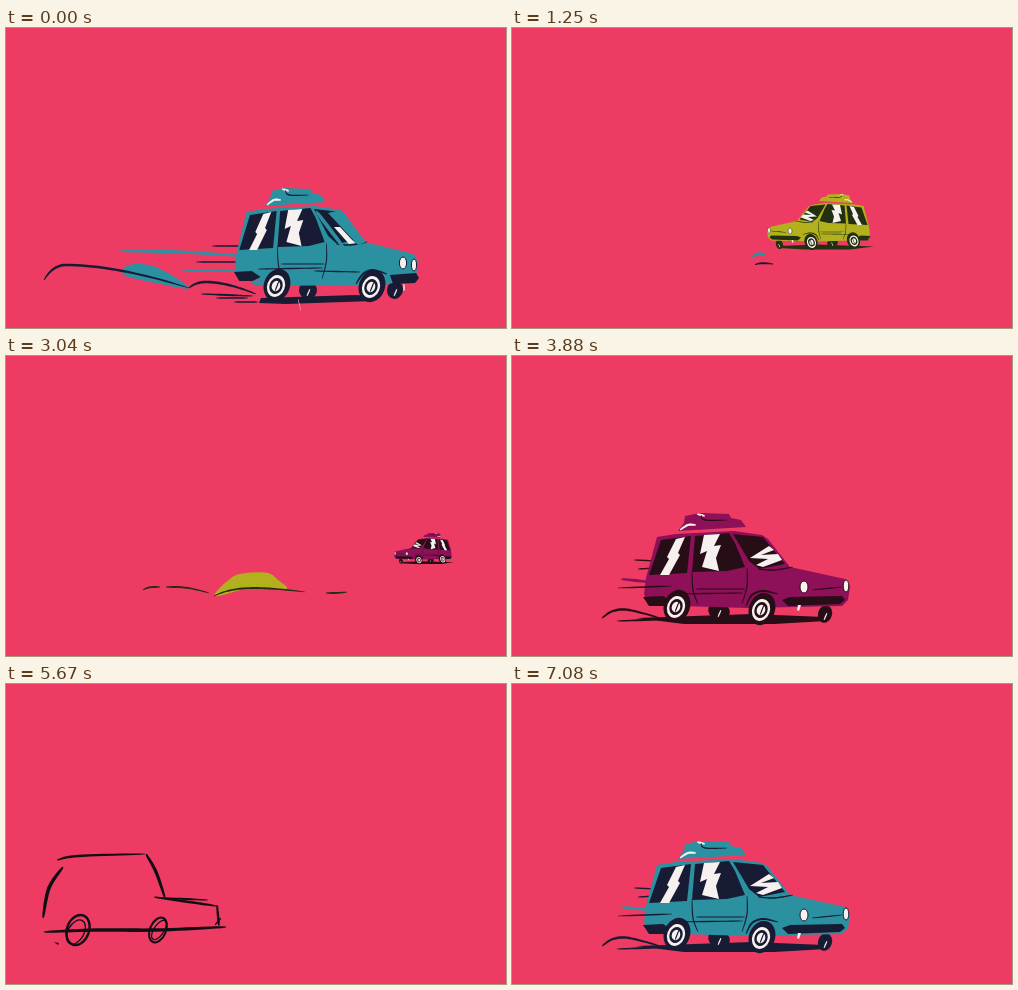
Recreate the animation shown at these times as an HTML page with a canvas. Size 500 by 300 pixels, loop 7120 ms.

```html
<!DOCTYPE html>
<html lang="en">
<head>
<meta charset="utf-8">
<title>Road trip</title>
<style>
html, body { margin: 0; width: 100%; height: 100%; overflow: hidden; background: #ed3b63; }
canvas { display: block; width: 100vw; height: 100vh; }
</style>
</head>
<body>
<canvas id="stage" width="500" height="300"></canvas>
<script>
const g = document.getElementById('stage').getContext('2d');
const LOOP = 7120, FRAMES = 171;
const BG = '#ed3b63', WHITE = '#f6f1ef';

// `at` is the frame (24 per second) in which the car is in full swing to the right
const CARS = [
  { at: 0, body: '#2b90a0', dark: '#171b33' },
  { at: 47, body: '#b2b01d', dark: '#22300f' },
  { at: 94, body: '#8e1058', dark: '#260d16' },
  { at: 138, dark: '#120f14', rough: true }
];

// Drawings are held on twos, on ones at full speed, on threes for the rough car
function held(n) {
  if (n >= 130 && n < 145) return n < 141 ? n - (n - 130) % 3 : 141;
  if (n >= 145 && n < 148) return 145;
  const odd = n > 48 && n < 94;
  const fast = CARS.some(c => !c.rough && Math.abs(n - c.at) < 2);
  return fast || n % 2 === (odd ? 1 : 0) ? n : n - 1;
}

const mix = (a, b, k) => a + (b - a) * k;

// keys: [time, ...numbers]; null outside the covered span
function tween(keys, t) {
  if (t < keys[0][0] || t > keys[keys.length - 1][0]) return null;
  let i = 0;
  while (i < keys.length - 2 && t > keys[i + 1][0]) i++;
  const a = keys[i], b = keys[i + 1] || a, k = (t - a[0]) / (b[0] - a[0] || 1);
  return a.slice(1).map((v, j) => mix(v, b[j + 1], k));
}

const pairs = p => p.filter((_, i) => i % 2 === 0).map((x, i) => [x, p[2 * i + 1]]);

// Catmull-Rom samples through points
function curve(pts, closed) {
  const n = pts.length, out = [];
  const at = i => pts[closed ? (i + n) % n : Math.max(0, Math.min(n - 1, i))];
  for (let i = 0; i < (closed ? n : n - 1); i++) {
    const [a, b, c, d] = [at(i - 1), at(i), at(i + 1), at(i + 2)];
    for (let u = 0; u < 0.99; u += 0.1) {
      out.push([0, 1].map(j => b[j] + u / 2 * (c[j] - a[j] + u * (2 * a[j] - 5 * b[j] + 4 * c[j] - d[j]
        + u * (3 * (b[j] - c[j]) + d[j] - a[j])))));
    }
  }
  if (!closed) out.push(at(n - 1));
  return out;
}

// Rises steeply to the peak, then falls away gently
function hill([ax, ay, px, py, bx, by]) {
  const out = [];
  const arc = (x0, y0, cx, x1, y1) => {
    for (let u = 0; u < 1; u += 0.05) {
      const v = 1 - u;
      out.push([v * v * x0 + 2 * u * v * cx + u * u * x1, v * v * y0 + 2 * u * v * py + u * u * y1]);
    }
  };
  arc(ax, ay, mix(ax, px, 0.4), px, py);
  arc(px, py, mix(px, bx, 0.4), bx, by);
  out.push([bx, by]);
  return out;
}

function fill(color, pts) {
  g.fillStyle = color;
  g.beginPath();
  pts.forEach(([x, y]) => g.lineTo(x, y));
  g.closePath();
  g.fill();
}

const poly = (color, ...p) => fill(color, pairs(p));

// Brush line, thin at both ends
function ink(color, w, c) {
  const up = [], down = [], last = c.length - 1;
  c.forEach(([x, y], i) => {
    const a = c[Math.max(0, i - 1)], b = c[Math.min(last, i + 1)];
    const dx = b[0] - a[0], dy = b[1] - a[1], len = Math.hypot(dx, dy) || 1;
    const h = w / 2 * (0.25 + 0.75 * Math.pow(Math.max(0, Math.sin(Math.PI * i / last)), 0.45));
    up.push([x - dy / len * h, y + dx / len * h]);
    down.unshift([x + dy / len * h, y - dx / len * h]);
  });
  fill(color, up.concat(down));
}

const brush = (color, w, ...p) => ink(color, w, curve(pairs(p)));

function oval(color, x, y, rx, ry, rot = 0, line = 0) {
  g.beginPath();
  g.ellipse(x, y, rx, ry, rot, 0, 7);
  g.fillStyle = g.strokeStyle = color;
  g.lineWidth = line;
  line ? g.stroke() : g.fill();
}

function wheel(d, x, y) {
  [d, WHITE, d, WHITE].forEach((color, i) => {
    const k = [1, 0.68, 0.5, 0.32][i];
    oval(color, x - (i && 1), y + (i && 1), 13 * k, 16.5 * k, 0.35);
  });
  brush(d, 1.2, x + 2, y - 4, x - 2, y + 6);
}

function farWheel(d, x, y, rx) {
  oval(d, x, y, rx, 9, 0.3);
  brush(WHITE, 1.3, x - 1, y + 6, x + 2, y - 1);
}

function lamp(d, x, y, rx) {
  oval(WHITE, x, y, rx, 6);
  oval(d, x, y, rx, 6, 0, 1);
}

function shell(c, d) {
  poly(c, 173, 160, 188, 157, 217, 158, 219, 162, 229, 164, 234, 171, 166, 175, 172, 167);
  brush(WHITE, 2.2, 168, 174, 176, 169, 184, 169);
  brush(WHITE, 2, 185, 158, 193, 160);
  brush(d, 1.3, 189, 159, 193, 164, 215, 164);
  poly(c, 145, 181, 164, 178, 222, 175, 250, 179, 256, 183, 278, 211, 333, 223, 338, 230,
    336, 244, 330, 250, 235, 252, 136, 249, 132, 238, 134, 222);
  poly(d, 149, 184, 179, 180, 175, 217, 137, 219);
  poly(WHITE, 164, 183, 173, 181, 166, 197, 168, 199, 157, 219, 148, 219, 157, 203, 155, 201);
  poly(d, 183, 180, 217, 177, 223, 187, 233, 211, 215, 215, 180, 216);
  poly(WHITE, 192, 179, 208, 178, 202, 190, 209, 189, 204, 202, 207, 215, 190, 211, 195, 195, 188, 198);
  poly(d, 221, 178, 251, 181, 273, 208, 247, 213, 237, 205);
  brush(d, 1.5, 246, 213, 262, 214, 281, 211);
  brush(d, 1.2, 180, 215, 181, 234, 186, 248);
  brush(d, 1.2, 235, 212, 235, 230, 230, 248);
  brush(d, 1.1, 184, 233, 233, 233);
  brush(d, 1.3, 158, 238, 231, 237);
  poly(d, 131, 241, 151, 240, 161, 246, 152, 250, 137, 250);
}

// Three-quarter view: nose at x 338, ground at y 268
function carFront({ body: c, dark: d }, fast) {
  if (fast) {
    brush(d, 2.4, 90, 262, 101, 255, 117, 254, 148, 262);
    brush(d, 1.8, 105, 265, 160, 263);
    brush(d, 1.4, 122, 204, 146, 205);
    brush(d, 1.4, 126, 213, 144, 212);
    brush(c, 2.8, 109, 223, 138, 226);
  }
  poly(d, 124, 262, 240, 258, 312, 261, 314, 265, 262, 268, 172, 268);
  farWheel(d, 207, 255, 11);
  farWheel(d, 313, 258, 7);
  shell(c, d);
  poly(WHITE, 238, 202, 257, 190, 262, 194, 249, 199, 266, 198, 270, 204, 251, 211, 244, 209, 256, 203);
  if (fast) brush(d, 1.4, 106, 232, 160, 230);
  brush(d, 1.2, 300, 234, 330, 231);
  poly(d, 270, 244, 278, 241, 330, 240, 333, 244, 328, 248, 276, 250);
  poly(WHITE, 286, 249, 289, 249, 287, 255, 285, 254);
  brush(d, 2, 234, 250, 240, 239, 251, 235, 266, 238);
  wheel(d, 165, 250);
  wheel(d, 250, 253);
  lamp(d, 292, 231, 4);
  lamp(d, 334, 230, 2.8);
}

// Side-on view while speeding off: the same shell, narrower, with its own running gear
function carSide({ body: c, dark: d }) {
  brush(c, 3, 113, 223, 175, 224, 238, 228);
  brush(d, 1.6, 206, 218, 236, 218);
  brush(d, 1.5, 190, 234, 234, 234);
  brush(c, 2, 175, 242, 232, 243);
  brush(d, 1.8, 195, 266, 247, 268);
  brush(d, 1.5, 210, 270, 242, 270);
  brush(d, 1.6, 228, 274, 252, 274);
  poly(d, 255, 270, 350, 267, 374, 269, 367, 273, 280, 276, 253, 275);
  brush('#f7a0b3', 0.8, 292, 271, 295, 283);
  farWheel(d, 302, 262, 9);
  farWheel(d, 389, 262, 8);
  place(111.5, 3, 0.889, 1, () => shell(c, d));
  poly(c, 244, 253, 378, 253, 410, 250, 378, 257, 250, 258);
  poly(c, 335, 182, 360, 214, 352, 217, 322, 185);
  brush(c, 4, 310, 183, 338, 220);
  poly(WHITE, 328, 199, 334, 199, 349, 215, 343, 216);
  brush(d, 1.3, 308, 243, 354, 244);
  poly(d, 384, 247, 410, 245, 413, 250, 409, 255, 387, 256);
  brush(WHITE, 1.4, 398, 256, 398, 263);
  brush(d, 2, 350, 256, 357, 246, 367, 242, 381, 246);
  wheel(d, 271, 257);
  wheel(d, 366, 258);
  lamp(d, 397, 235, 3.6);
  lamp(d, 408, 237, 2.6);
}

// Pencil version: nose at x 220
function carRough({ dark: d }) {
  brush(d, 2.4, 51, 176, 72, 172, 139, 170);
  brush(d, 3.6, 57, 183, 43, 204, 37, 234);
  brush(d, 3.2, 140, 170, 150, 188, 159, 214);
  brush(d, 2.6, 148, 213, 176, 217, 211, 222);
  brush(d, 1.8, 158, 214, 202, 216);
  brush(d, 2.4, 211, 221, 213, 242);
  brush(d, 1.6, 215, 234, 209, 241);
  brush(d, 3.6, 38, 248, 90, 246, 150, 246, 220, 243);
  oval(d, 72, 246, 11, 15.5, 0.35, 2.4);
  oval(d, 70, 248, 8, 13, 0.5, 1.3);
  oval(d, 152, 246, 8, 13, 0.4, 2);
  oval(d, 153, 246, 5, 11, 0.6, 1.2);
  poly(d, 48, 258, 53, 259, 52, 261);
}

// Before its first key a shape drifts in from the lower right,
// after its last it shrinks to its middle
function drift(t, from, to, ...keys) {
  if (t < from || t > to) return null;
  const first = keys[0][0], last = keys[keys.length - 1][0];
  const p = tween(keys, Math.max(first, Math.min(last, t)));
  const early = Math.max(0, first - t), k = t > last ? (t - last) / (to - last) : 0;
  const mid = [0, 1].map(j => p.reduce((s, v, i) => s + (i % 2 === j ? v : 0), 0) / (p.length / 2));
  return p.map((v, i) => mix(v + early * (i % 2 ? 3 : 10), mid[i % 2], k));
}

function dust({ body, dark }, t) {
  const puff = (from, to, ...keys) => {
    const p = drift(t, from, to, ...keys);
    if (p) fill(body, curve(pairs(p), true));
  };
  const w = t < 16 ? mix(2.6, 3.8, Math.min(1, t / 12)) : mix(3.8, 1.9, Math.min(1, (t - 16) / 10));
  const hump = (from, to, ...keys) => {
    const p = drift(t, from, to, ...keys);
    if (p) ink(dark, w, hill(p));
  };
  puff(0, 13,
    [0, 118, 247, 123, 237, 150, 239, 183, 260, 150, 255],
    [12, -10, 240, -8, 215, 4, 218, 18, 226, 4, 250]);
  puff(4, 15, [12, 246, 194, 263, 189, 282, 192, 305, 206, 298, 213]);
  puff(2, 31,
    [12, 331, 200, 340, 180, 357, 177, 377, 186, 391, 183, 438, 222, 393, 230],
    [16, 304, 200, 325, 179, 340, 177, 356, 180, 380, 195, 410, 216, 368, 222],
    [26, 209, 240, 225, 222, 240, 217, 262, 217, 272, 224, 280, 233, 245, 232]);
  hump(0, 19, [0, 38, 252, 60, 237, 183, 260], [12, 10, 239, 68, 207, 157, 243], [16, -10, 245, 48, 211, 93, 216]);
  hump(0, 29, [0, 183, 260, 200, 254, 250, 266], [12, 130, 212, 185, 184, 298, 214],
    [16, 118, 215, 183, 188, 271, 214], [26, 160, 231, 170, 231, 203, 237]);
  hump(2, 31, [12, 298, 214, 321, 200, 393, 230], [16, 271, 214, 307, 201, 368, 222], [26, 208, 240, 248, 232, 299, 236]);
  hump(2, 28, [12, 393, 230, 424, 221, 510, 250], [16, 368, 222, 403, 216, 510, 260], [26, 320, 237, 328, 237, 341, 236]);
  hump(8, 13, [12, -4, 264, 2, 248, 4, 247]);
  hump(22, 28, [26, 137, 234, 148, 231, 154, 231]);
}

// time, nose x, scale
const COMING = [[-26, 492, 0.22], [-21, 388, 0.28], [-17, 255, 0.5], [-14, 90, 0.9], [-11, -150, 1.25], [-9, -420, 1.3]];
const ENTER = [[-7, 90, 1.15], [-1, 338, 1]];
const LEAVE = [[0, 0, 0], [4, 330, 9]];

function place(x, y, sx, sy, draw) {
  g.save();
  g.translate(x, y);
  g.scale(sx, sy);
  draw();
  g.restore();
}

function drive(car, t) {
  let p = tween(COMING, t);
  if (p) {
    const [x, s] = p;
    place(x, 208 + (s - 0.28) * 61, -s, s, () => {
      g.translate(car.rough ? -220 : -338, car.rough ? -262 : -268);
      car.rough ? carRough(car) : carFront(car, false);
    });
  }
  if (car.rough) {
    if (t >= -2 && t < 3) place(t < 1 ? 0 : 245, 0, 1, 1, () => carRough(car));
    return;
  }
  if ((p = tween(ENTER, t))) {
    place(p[0], 268, p[1], p[1], () => {
      g.translate(-338, -268);
      carFront(car, true);
    });
  }
  if ((p = tween(LEAVE, t))) place(p[0], p[1], 1, 1, () => carSide(car));
}

function render(ms) {
  const n = held(Math.floor((ms % LOOP) * 0.024 + 0.15) % FRAMES);
  g.fillStyle = BG;
  g.fillRect(0, 0, 500, 300);
  const clock = car => (n - car.at + 40 + FRAMES) % FRAMES - 40;
  for (const car of CARS) if (!car.rough) dust(car, clock(car));
  for (const car of CARS) drive(car, clock(car));
}

const start = performance.now();
function tick() {
  render(performance.now() - start);
  requestAnimationFrame(tick);
}
tick();
</script>
</body>
</html>
```
